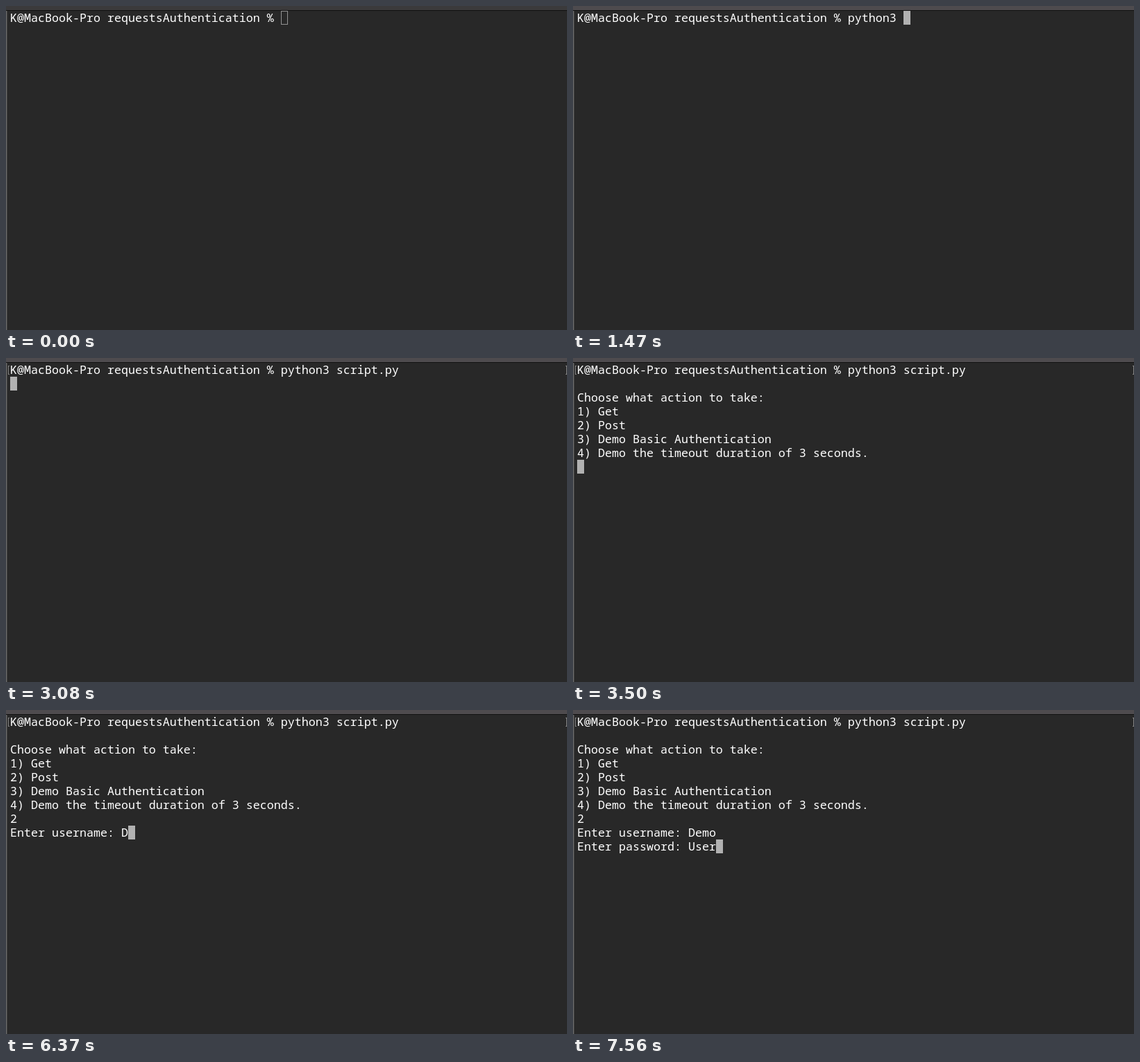
Animation of 808 by 468 pixels, one loop 8 s. Source, as an HTML page with a canvas:

```html
<!DOCTYPE html>
<html lang="en">
<head>
<meta charset="utf-8">
<title>Terminal session</title>
<style>
html, body { margin: 0; width: 100%; height: 100%; overflow: hidden; background: #282828; }
canvas { display: block; }
</style>
</head>
<body>
<canvas id="stage" width="808" height="468"></canvas>
<script>
const ctx = document.getElementById("stage").getContext("2d");
const LOOP = 8000, LEFT = 6, TOP = 7, CELL = 10, ROW = 20;
const FOCUS = 770, ENTER = 3080;

// Each entry appends text to the terminal at the given time.
const output = [
  [0, "K@MacBook-Pro requestsAuthentication % "],
  [980, "p"], [1120, "y"], [1190, "t"], [1260, "ho"],
  [1400, "n"], [1470, "3 "],
  [1960, "s"], [2170, "c"], [2380, "r"], [2450, "ip"],
  [2590, "t"], [2660, "."], [2800, "p"], [2940, "y"],
  [ENTER, "\n"],
  [3500, "\nChoose what action to take:\n1) Get\n2) Post\n" +
    "3) Demo Basic Authentication\n" +
    "4) Demo the timeout duration of 3 seconds.\n"],
  [4480, "2"],
  [4830, "\nEnter username: "],
  [6370, "D"], [6440, "e"], [6510, "m"], [6580, "o"],
  [6790, "\nEnter password: "],
  [7350, "U"], [7490, "s"], [7560, "er"]
];

function rect(color, x, y, w, h) {
  ctx.fillStyle = color;
  ctx.fillRect(x, y, w, h);
}

function drawWindow(focused) {
  rect("#282828", 0, 0, 808, 468);
  rect("#6c6c6c", 0, 7, 1, 461);
  rect("#444", 1, 7, 1, 461);
  rect(focused ? "#4e4b4e" : "#3b3a3b", 0, 0, 808, 6);
  rect("#101010", 0, 6, 808, 1);
}

function drawCursor(x, y, focused) {
  if (focused) return rect("#b1b1b1", x, y, CELL, ROW);
  ctx.strokeStyle = "#929292";
  ctx.strokeRect(x + 0.5, y + 0.5, CELL - 1, ROW - 1);
}

// Prompt marks at the window's edges
function drawMarks() {
  rect("#858585", 3, 11, 1, 13);
  rect("#858585", 3, 11, 2, 1);
  rect("#858585", 3, 23, 2, 1);
  rect("#858585", 807, 11, 1, 13);
  rect("#858585", 806, 11, 2, 1);
  rect("#858585", 806, 23, 2, 1);
}

function draw(time) {
  const focused = time >= FOCUS;
  const lines = output.filter(([at]) => at <= time)
    .map(([, text]) => text).join("").split("\n");
  const last = lines.length - 1;

  drawWindow(focused);
  if (time >= ENTER) drawMarks();
  drawCursor(LEFT + lines[last].length * CELL, TOP + last * ROW, focused);

  ctx.font = '500 16.6667px "Noto Sans Mono", "DejaVu Sans Mono", monospace';
  ctx.fillStyle = "#fff";
  lines.forEach((line, row) => ctx.fillText(line, LEFT, TOP + 16 + row * ROW));
}

function tick() {
  draw(performance.now() % LOOP);
  requestAnimationFrame(tick);
}
tick();
</script>
</body>
</html>
```
